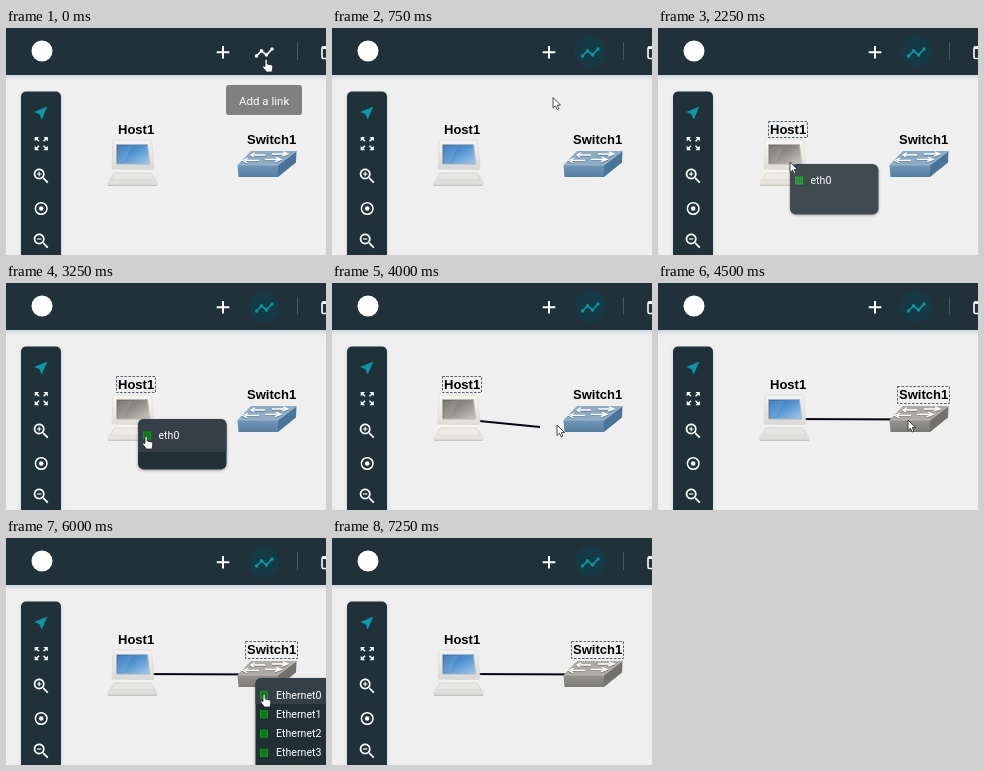
Recreate the animation shown at these times as an HTML page. Size 320x227 px, loop 7.5 s.

```html
<!DOCTYPE html>
<html lang="en">
<head>
<meta charset="utf-8">
<title>Adding a link</title>
<style>
html, body { margin: 0; width: 100%; height: 100%; overflow: hidden; background: #efefef; }
svg { display: block; width: 100%; height: 100%; }
text { font: 10.6px Roboto, sans-serif; fill: #fff; }
.name { font: bold 13px "Liberation Sans", Arial, sans-serif; fill: #000; }
.frame { fill: none; stroke: #58626c; stroke-width: 1; stroke-dasharray: 2.5 1.5; }
.bar { fill: #20313a; filter: drop-shadow(0 2px 2px #a9c3d399); }
.menu { fill: #222f35; filter: drop-shadow(0 1px 1.5px #0005); }
.row { fill: #343f48; }
.port { fill: #0b7d16; stroke: #0a9a1c; stroke-width: 1; }
.gray { filter: grayscale(1) sepia(.1); }
</style>
</head>
<body>
<svg viewBox="0 0 320 227" preserveAspectRatio="none">
  <defs>
    <linearGradient id="screenFill" x2="1" y2="1">
      <stop offset="0" stop-color="#2f6db5"/><stop offset=".45" stop-color="#4f92d0"/><stop offset="1" stop-color="#a3caea"/>
    </linearGradient>
    <linearGradient id="shell" x2="0" y2="1">
      <stop offset="0" stop-color="#f3f3f2"/><stop offset="1" stop-color="#d8d9d7"/>
    </linearGradient>
    <linearGradient id="frontFill" x2="0" y2="1">
      <stop offset="0" stop-color="#7396b7"/><stop offset="1" stop-color="#557ea3"/>
    </linearGradient>
    <path id="lens" d="M15.5 14h-.79l-.28-.27C15.41 12.59 16 11.11 16 9.5 16 5.91 13.09 3 9.5 3S3 5.91 3 9.5 5.91 16 9.5 16c1.61 0 3.09-.59 4.23-1.57l.27.28v.79l5 4.99L20.49 19zm-6 0C7.01 14 5 11.99 5 9.5S7.01 5 9.5 5 14 7.01 14 9.5 11.99 14 9.5 14z"/>
    <path id="arrows" d="M259 127H246M249 124.800L245 127L248 129.200M253 132.500H239M242 130.300L237 132.500L241 134.700M266 126H280M277 123.800L282 126L276 128.200M259 131.500H273M270 129.300L275 131.500L269 133.700"/>
  </defs>
  <rect width="320" height="227" fill="#efefef"/>

  <path id="link" stroke="#050510" stroke-width="1.9"/>

  <g id="host">
    <path d="M106 141L107 114Q107 112 109 112H143Q145 112 145.500 114L148 139Q148 142 145 142Z" fill="url(#shell)" stroke="#d2d3d2" stroke-width=".6"/>
    <path d="M110.500 116.500H141.500L143.500 136H110.500Z" fill="url(#screenFill)" stroke="#a9b4bc" stroke-width="1"/>
    <path d="M112 118H126L118 134H112Z" fill="#fff" opacity=".1"/>
    <path d="M107 142H146L151.500 154Q152.500 158 149 158H104Q100 158 101.500 154Z" fill="url(#shell)"/>
    <path d="M108 145H145L148.500 152H105Z" fill="#e6e7e4" stroke="#cdcfcd" stroke-width=".7"/>
    <path d="M102 157.300H151" stroke="#bcbfbe"/>
  </g>
  <rect id="hostFrame" class="frame" x="110.5" y="93.5" width="39" height="16"/>
  <text class="name" x="112" y="106">Host1</text>

  <g id="switch">
    <path d="M231.500 137L245 123H290.500L272 137Z" fill="#8eabc4"/>
    <path d="M231.500 137H272V149H232.500Z" fill="url(#frontFill)"/>
    <path d="M272 137L290.500 123L290 134.500L272 149Z" fill="#4a759b"/>
    <path d="M232 137H272L290.500 123" fill="none" stroke="#a8c0d3" stroke-width=".7"/>
    <g fill="none">
      <use href="#arrows" y=".8" stroke="#566f8c" stroke-width="1.3"/>
      <use href="#arrows" stroke="#fff" stroke-width="1.3"/>
    </g>
  </g>
  <rect id="switchFrame" class="frame" x="239.5" y="103.5" width="52" height="17"/>
  <text class="name" x="241" y="116">Switch1</text>

  <rect class="bar" x="-4" y="-4" width="328" height="51"/>
  <circle cx="36" cy="23" r="10.5" fill="#fff"/>
  <path d="M217 18V30.500M210.700 24.300H223.300" stroke="#fff" stroke-width="2"/>
  <circle id="halo" cx="258" cy="23.700" r="15.5" fill="#153a45"/>
  <g id="linkIcon">
    <path d="M250.5 28L255.5 22.8L260.5 27L266 21" fill="none" stroke="currentColor" stroke-width="1.7"/>
    <g fill="currentColor"><circle cx="250.5" cy="28" r="1.7"/><circle cx="255.5" cy="22.8" r="1.7"/><circle cx="260.5" cy="27" r="1.7"/><circle cx="266" cy="21" r="1.7"/></g>
  </g>
  <path d="M291.5 14V32" stroke="#465963"/>
  <path d="M322 19H317.500Q316 19 316 20.500V29Q316 30.500 317.500 30.500H322" fill="none" stroke="#fff" stroke-width="1.6"/>
  <path d="M316 19.800H322" stroke="#fff" stroke-width="2.5"/>

  <rect class="bar" x="15" y="63.500" width="40" height="180" rx="5"/>
  <g fill="#fff">
    <path transform="translate(26.6 76.3) scale(.7)" fill="#0797a5" d="M21 3L3 10.53v.98l6.84 2.65L12.48 21h.98z"/>
    <path transform="translate(26.5 106.8) scale(.73)" d="M15 3l2.3 2.3-2.89 2.87 1.42 1.42L18.7 6.7 21 9V3zM3 9l2.3-2.3 2.87 2.89 1.42-1.42L6.7 5.3 9 3H3zm6 12l-2.3-2.3 2.89-2.87-1.42-1.42L5.3 17.3 3 15v6zm12-6l-2.3 2.3-2.87-2.89-1.42 1.42 2.89 2.87L15 21h6z"/>
    <g transform="translate(25.2 138) scale(.84)"><use href="#lens"/><path d="M12.2 10.2h-2v2H8.8v-2h-2V8.8h2v-2h1.4v2h2z"/></g>
    <circle cx="35.2" cy="180.500" r="5.8" fill="none" stroke="#fff" stroke-width="1.5"/>
    <circle cx="35.2" cy="180.500" r="2.3"/>
    <g transform="translate(25.2 203) scale(.84)"><use href="#lens"/><path d="M7 8.8h5v1.4H7z"/></g>
  </g>

  <g id="tooltip">
    <rect x="220" y="57" width="76" height="30" rx="3" fill="#808080"/>
    <text x="233" y="76.5" style="font-size:11.5px">Add a link</text>
  </g>

  <g id="hostMenu">
    <rect class="menu" x="132" y="136" width="88.5" height="50.5" rx="6"/>
    <path id="hostRow" class="row" d="M132 169V142Q132 136 138 136H214.500Q220.500 136 220.500 142V169Z"/>
    <rect class="port" x="137.500" y="149" width="7" height="7"/>
    <text x="152.500" y="156">eth0</text>
  </g>
  <g id="switchMenu">
    <rect class="menu" x="249.500" y="140" width="90" height="100" rx="6"/>
    <path class="row" d="M249.500 166V146Q249.500 140 255.500 140H320V166Z"/>
    <g id="ports"></g>
  </g>

  <path id="arrow" d="M0 0V10.500L2.500 8.300L4.200 12L5.900 11.200L4.300 7.600H7.500Z" fill="#fff" stroke="#222" stroke-width=".8"/>
  <path id="hand" d="M-1 1Q0 -.8 1.200 1V5L5.500 6Q7 6.500 6.800 8L6 13H.5L-3.500 8Q-3.500 6 -1 7.500Z" fill="#fff" stroke="#222" stroke-width=".8"/>
</svg>
<script>
const LOOP = 7500, STEP = 250;
const el = id => document.getElementById(id);
const show = (id, opacity) => el(id).setAttribute("opacity", Number(opacity));

el("ports").innerHTML = [0, 1, 2, 3].map(i => {
  const y = 157 + i * 19.3;
  return `<rect class="port" x="254.500" y="${y - 3.5}" width="7" height="7"/>
    <text x="270" y="${y + 3.5}">Ethernet${i}</text>`;
}).join("");

// Pointer stops: time, x, y
const stops = [
  [0, 260, 31], [500, 260, 31], [1000, 182, 108], [1500, 182, 108],
  [2000, 132, 134], [2500, 132, 134], [3000, 140, 153], [3500, 140, 153],
  [4000, 225, 142], [4500, 250, 137], [5000, 250, 137], [5500, 258, 156],
  [6000, 258, 156], [6500, 242, 174], [LOOP, 242, 174]
];

function pointerAt(t) {
  const i = stops.findIndex(s => s[0] > t);
  const [t0, x0, y0] = stops[i - 1], [t1, x1, y1] = stops[i];
  const p = (t - t0) / (t1 - t0), e = p * p * (3 - 2 * p);
  return [x0 + (x1 - x0) * e, y0 + (y1 - y0) * e];
}

function draw(t) {
  const within = (a, b) => t >= a && t < b;
  const armed = t >= 500, hostHover = within(2000, 4250), switchHover = t >= 4500;
  const [x, y] = pointerAt(t);

  show("tooltip", t < 500);
  show("halo", armed);
  el("linkIcon").style.color = armed ? "#0797a5" : "#fff";

  el("host").setAttribute("class", hostHover ? "gray" : "");
  el("switch").setAttribute("class", switchHover ? "gray" : "");
  show("hostFrame", hostHover);
  show("switchFrame", switchHover);
  show("hostMenu", within(2250, 3500) && (t < 2500 ? .85 : 1));
  show("hostRow", t >= 2750);
  show("switchMenu", within(4750, 6250));

  const end = t < 4250 ? [x - 17, y + 2] : [261, 136.5];
  show("link", t >= 3750);
  el("link").setAttribute("d", `M127 136L${end}`);

  const pointing = t < 500 || within(3000, 3500) || within(5500, 6250);
  show("hand", pointing);
  show("arrow", !pointing && t < 7250);
  for (const id of ["hand", "arrow"]) el(id).setAttribute("transform", `translate(${x} ${y})`);
}

function tick() {
  draw(Math.floor(performance.now() % LOOP / STEP) * STEP);
  requestAnimationFrame(tick);
}
tick();
</script>
</body>
</html>
```
